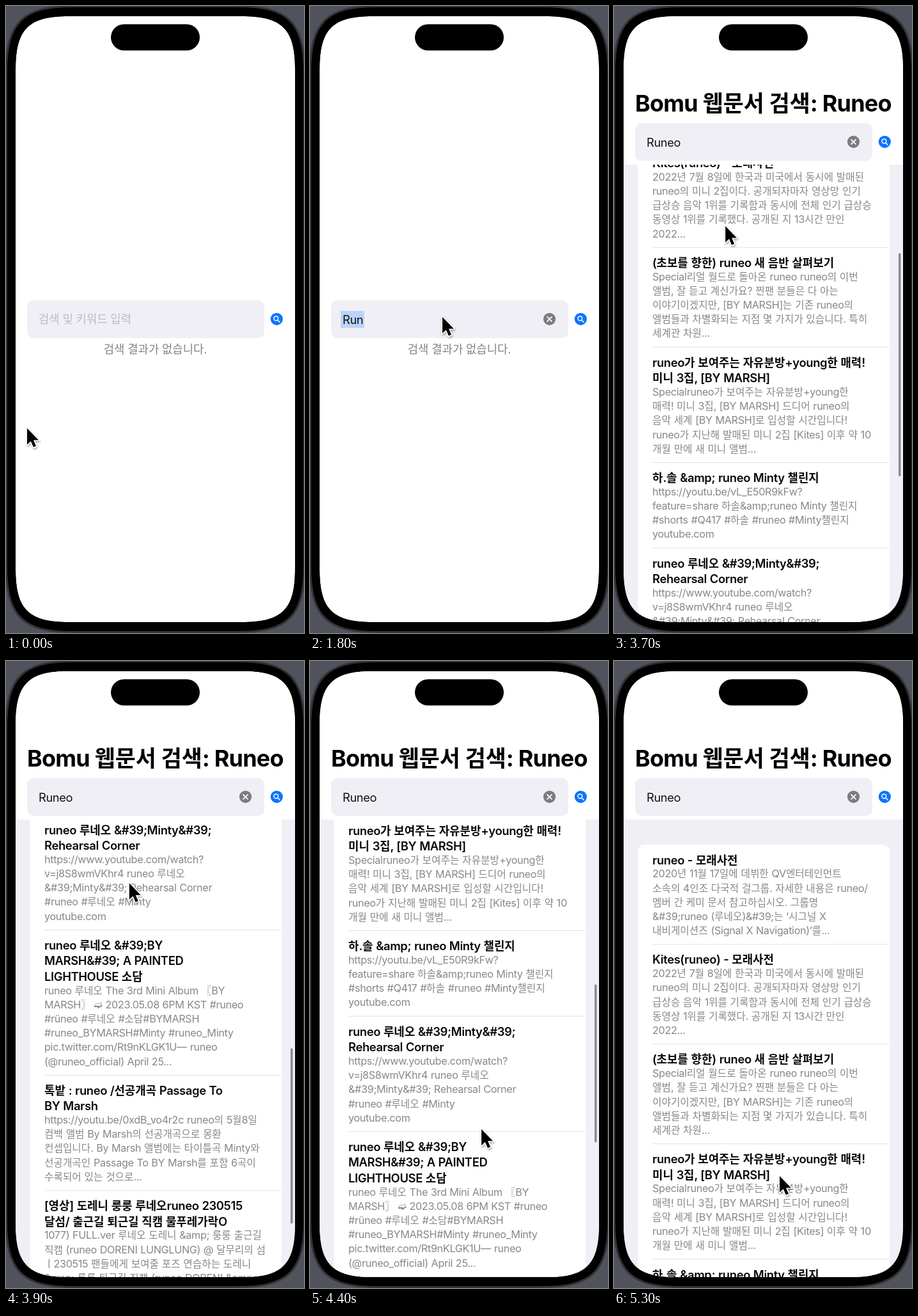
Recreate the animation shown at these times as an HTML page. Size 466 by 980 pixels, loop 5.4 s.

```html
<!DOCTYPE html>
<html lang="ko">
<head>
<meta charset="utf-8">
<title>웹문서 검색</title>
<style>
  html, body { margin: 0; width: 100%; height: 100%; overflow: hidden; background: #50525c; }
  svg { display: block; width: 466px; height: 980px; }
  text {
    font-family: Inter, "Noto Sans CJK KR", "DejaVu Sans", sans-serif;
    letter-spacing: -.02em; white-space: pre;
  }
  .ko { font-size: .97em; letter-spacing: 0; }
  .body { font-size: 18.3px; fill: #111; }
  .head { font-size: 18.4px; font-weight: 600; fill: #080808; word-spacing: .03em; }
  .sub { font-size: 16.2px; fill: #87878b; word-spacing: .03em; }
  .big { font-size: 35.9px; font-weight: 700; fill: #000; }
</style>
</head>
<body>
<svg viewBox="0 0 466 980" xmlns="http://www.w3.org/2000/svg">
  <defs>
    <clipPath id="screenClip"><path id="clipShape"/></clipPath>
    <filter id="shadow" x="-50%" y="-50%" width="200%" height="200%">
      <feDropShadow dx="1" dy="2" stdDeviation="1.4" flood-opacity=".35"/>
    </filter>
  </defs>
  <path id="bezel" stroke="#323335" stroke-width="3"/>
  <g id="view" clip-path="url(#screenClip)">
    <path id="screen" fill="#fff"/>
    <g id="results">
      <rect x="15" y="248" width="437" height="716" fill="#f0eff5"/>
      <g id="list"></g>
      <rect x="15" y="16" width="437" height="232" fill="#fff"/>
      <rect id="thumb" x="445" width="3.4" rx="1.7" fill="#88888c"/>
    </g>
    <g id="bar">
      <rect x="33" y="460" width="371" height="59" rx="10" fill="#f0eff5"/>
      <rect id="mark" x="48" y="476.5" height="26.5" fill="#bad4f8"/>
      <rect id="caret" x="51" y="478" width="2" height="23" rx="1" fill="#0a75ff"/>
      <g id="clear">
        <circle cx="374.5" cy="489.3" r="9.6" fill="#7c7c80"/>
        <path d="M371 485.8l7 7m0-7l-7 7" stroke="#fff" stroke-width="1.7" stroke-linecap="round"/>
      </g>
      <circle cx="423.3" cy="489.3" r="9.6" fill="#0a75ff"/>
      <g fill="none" stroke="#fff" stroke-width="1.5" stroke-linecap="round">
        <circle cx="422.3" cy="488.3" r="3.4"/>
        <path d="M425 491l2.9 2.9"/>
      </g>
    </g>
  </g>
  <rect x="164" y="28.5" width="139" height="41" rx="20.5"/>
  <path id="cursor" d="M0 0V25.500L5.800 20.200 9.900 29.600 14 27.800 10 18.600H18Z"
    stroke="#fff" stroke-width="3" stroke-linejoin="round" paint-order="stroke" filter="url(#shadow)"/>
</svg>
<script>
const $ = id => document.getElementById(id);
const LOOP = 5400, STEP = 100;
const CARD_TOP = 287, TITLE_LINE = 24.4, SUB_LINE = 22.2, ROW_PAD = 20.5;
const END = 1050, PULL = 23;

function add(parent, tag, attrs) {
  const el = document.createElementNS('http://www.w3.org/2000/svg', tag);
  for (const key in attrs) el.setAttribute(key, attrs[key]);
  return parent.appendChild(el);
}

// Hangul runs get their own size so both scripts look balanced.
function setText(el, str) {
  el.textContent = '';
  for (const run of str.split(/([\u3008-\u3017\u3130-\u318f\uac00-\ud7a3]+)/)) {
    const span = add(el, 'tspan', /[\u3008-\ud7a3]/.test(run) ? { class: 'ko' } : {});
    span.textContent = run;
  }
}

function label(parent, str, x, y, cls, attrs = {}) {
  const el = add(parent, 'text', { x, y, class: cls, ...attrs });
  setText(el, str);
  return el;
}

// Rounded box with smooth corners: e is the corner reach, c the control offset.
function smoothBox(x, y, w, h, e, c) {
  const r = x + w, b = y + h;
  return `M${x} ${y + e}C${x} ${y + c} ${x + c} ${y} ${x + e} ${y}H${r - e}` +
    `C${r - c} ${y} ${r} ${y + c} ${r} ${y + e}V${b - e}` +
    `C${r} ${b - c} ${r - c} ${b} ${r - e} ${b}H${x + e}` +
    `C${x + c} ${b} ${x} ${b - c} ${x} ${b - e}Z`;
}
$('bezel').setAttribute('d', smoothBox(.5, .5, 466, 978, 104, 25));
for (const id of ['clipShape', 'screen']) {
  $(id).setAttribute('d', smoothBox(15, 16, 437, 947, 84, 19.7));
}

// Each row: title lines, then summary lines.
const rows = [
  [['runeo - 모래사전'],
   ['2020년 11월 17일에 데뷔한 QV엔터테인먼트', '소속의 4인조 다국적 걸그룹. 자세한 내용은 runeo/',
    '멤버 간 케미 문서 참고하십시오. 그룹명', '&#39;runeo (루네오)&#39;는 ‘시그널 X',
    '내비게이션즈 (Signal X Navigation)’를...']],
  [['Kites(runeo) - 모래사전'],
   ['2022년 7월 8일에 한국과 미국에서 동시에 발매된', 'runeo의 미니 2집이다. 공개되자마자 영상망 인기',
    '급상승 음악 1위를 기록함과 동시에 전체 인기 급상승', '동영상 1위를 기록했다. 공개된 지 13시간 만인', '2022...']],
  [['(초보를 향한) runeo 새 음반 살펴보기'],
   ['Special리얼 월드로 돌아온 runeo runeo의 이번', '앨범, 잘 듣고 계신가요? 찐팬 분들은 다 아는',
    '이야기이겠지만, [BY MARSH]는 기존 runeo의', '앨범들과 차별화되는 지점 몇 가지가 있습니다. 특히', '세계관 차원...']],
  [['runeo가 보여주는 자유분방+young한 매력!', '미니 3집, [BY MARSH]'],
   ['Specialruneo가 보여주는 자유분방+young한', '매력! 미니 3집, [BY MARSH] 드디어 runeo의',
    '음악 세계 [BY MARSH]로 입성할 시간입니다!', 'runeo가 지난해 발매된 미니 2집 [Kites] 이후 약 10', '개월 만에 새 미니 앨범...']],
  [['하.솔 &amp; runeo Minty 챌린지'],
   ['https://youtu.be/vL_E50R9kFw?', 'feature=share 하솔&amp;runeo Minty 챌린지',
    '#shorts #Q417 #하솔 #runeo #Minty챌린지', 'youtube.com']],
  [['runeo 루네오 &#39;Minty&#39;', 'Rehearsal Corner'],
   ['https://www.youtube.com/watch?', 'v=j8S8wmVKhr4 runeo 루네오', '&#39;Minty&#39; Rehearsal Corner',
    '#runeo #루네오 #Minty', 'youtube.com']],
  [['runeo 루네오 &#39;BY', 'MARSH&#39; A PAINTED', 'LIGHTHOUSE 소담'],
   ['runeo 루네오 The 3rd Mini Album 〖BY', 'MARSH〗 ➫ 2023.05.08 6PM KST #runeo', '#rüneo #루네오 #소담#BYMARSH',
    '#runeo_BYMARSH#Minty #runeo_Minty', 'pic.twitter.com/Rt9nKLGK1U— runeo', '(@runeo_official) April 25...']],
  [['톡밭 : runeo /선공개곡 Passage To', 'BY Marsh'],
   ['https://youtu.be/0xdB_vo4r2c runeo의 5월8일', '컴백 앨범 By Marsh의 선공개곡으로 몽환',
    '컨셉입니다. By Marsh 앨범에는 타이틀곡 Minty와', '선공개곡인 Passage To BY Marsh를 포함 6곡이', '수록되어 있는 것으로...']],
  [['[영상] 도레니 룽룽 루네오runeo 230515', '달섬/ 출근길 퇴근길 직캠 물푸레가락O'],
   ['1077) FULL.ver 루네오 도레니 &amp; 룽룽 출근길', '직캠 (runeo DORENI LUNGLUNG) @ 달무리의 섬',
    'ㅣ230515 팬들에게 보여줄 포즈 연습하는 도레니', '&amp; 룽룽 퇴근길 직캠 (runeo DORENI &amp;',
    'LUNGLUNG) @ 달무리의 섬ㅣ230515']],
  [['[걸그룹] 소담 미랑 루네오 헴로HEMLO x', 'QTN/ runeo 졸린이웃 출근 노을통신'],
   ['[걸그룹] 도레니 룽룽 루네오runeo 헴로HEMLO', 'x QTN']]
];

function buildList() {
  const list = $('list');
  const card = add(list, 'rect', { x: 37.5, y: CARD_TOP, width: 393.5, rx: 10, fill: '#fff' });
  let top = CARD_TOP;
  rows.forEach(([titles, subs], i) => {
    if (i) add(list, 'rect', { x: 60, y: top - .5, width: 370, height: 1, fill: '#e2e2e4' });
    titles.forEach((s, n) => label(list, s, 60, top + 30.5 + n * TITLE_LINE, 'head'));
    const first = top + 26.9 + titles.length * TITLE_LINE;
    subs.forEach((s, n) => label(list, s, 60, first + n * SUB_LINE, 'sub'));
    top += titles.length * TITLE_LINE + subs.length * SUB_LINE + ROW_PAD;
  });
  card.setAttribute('height', top - CARD_TOP);
}
buildList();

label($('results'), 'Bomu 웹문서 검색: Runeo', 33, 164.5, 'big');
const empty = label($('view'), '검색 결과가 없습니다.', 233.5, 542.5, 'body',
  { 'text-anchor': 'middle', style: 'fill:#838387' });
const hint = label($('bar'), '검색 및 키워드 입력', 51, 496, 'body', { style: 'fill:#bbbbc0' });
const query = label($('bar'), '', 51, 496.5, 'body');

const progress = (t, from, to) => Math.min(1, Math.max(0, (t - from) / (to - from)));
const smooth = p => p * p * (3 - 2 * p);
const cubic = p => p < .5 ? 4 * p ** 3 : 1 - 4 * (1 - p) ** 3;

// Pointer moves: start, end, x, y
const moves = [
  [0, 500, 207, 486],
  [2400, 2700, 422, 490],
  [3000, 3400, 175, 500],
  [3400, 3800, 174, 315],
  [3800, 4200, 294, 522],
  [4200, 4500, 259, 805]
];

function cursorAt(t) {
  return moves.reduce(([x, y], [from, to, nx, ny]) => {
    const p = smooth(progress(t, from, to));
    return [x + (nx - x) * p, y + (ny - y) * p];
  }, [33, 660]);
}

// Fling down, fling back past the top, then settle.
function scrollAt(t) {
  if (t < 4200) return END * cubic(progress(t, 3400, 4200));
  if (t < 4600) return END - (END + PULL) * smooth(progress(t, 4200, 4600));
  return -PULL * (1 - progress(t, 4600, 5000)) ** 3;
}

// The thumb shrinks while new rows are laid out, and when pulled past the top.
function thumbAt(t, s) {
  const down = Math.max(0, s);
  return {
    y: 279 + .518 * down - .00015 * down * down,
    height: t < 4200 ? 376 - .123 * s : 247 + .87 * Math.min(0, s),
    opacity: progress(t, 3400, 3500) * (1 - progress(t, 5100, 5300))
  };
}

const show = (el, on) => el.setAttribute('visibility', on ? 'visible' : 'hidden');
const move = (el, x, y) => el.setAttribute('transform', `translate(${x} ${y})`);

function render(t) {
  const found = t >= 3000;
  show($('results'), found);
  show(empty, !found);
  move($('bar'), 0, found ? -277 : 0);

  const typed = 'Runeo'.slice(0, Math.max(0, Math.floor((t - 700) / 300)));
  const marked = typed && t < 2200;
  setText(query, typed);
  show(hint, !typed);
  show($('clear'), typed);
  show($('caret'), t >= 700 && !typed);
  show($('mark'), marked);
  $('mark').setAttribute('width', marked ? query.getComputedTextLength() + 4.5 : 0);

  show($('cursor'), t < 2800 || found);
  move($('cursor'), ...cursorAt(t));

  const s = scrollAt(t), bar = thumbAt(t, s);
  move($('list'), 0, -s);
  for (const key in bar) $('thumb').setAttribute(key, bar[key]);
}

const start = performance.now();
let last = -1;
function tick() {
  const t = Math.floor((performance.now() - start) % LOOP / STEP) * STEP;
  if (t !== last) render(last = t);
  requestAnimationFrame(tick);
}
tick();
</script>
</body>
</html>
```
